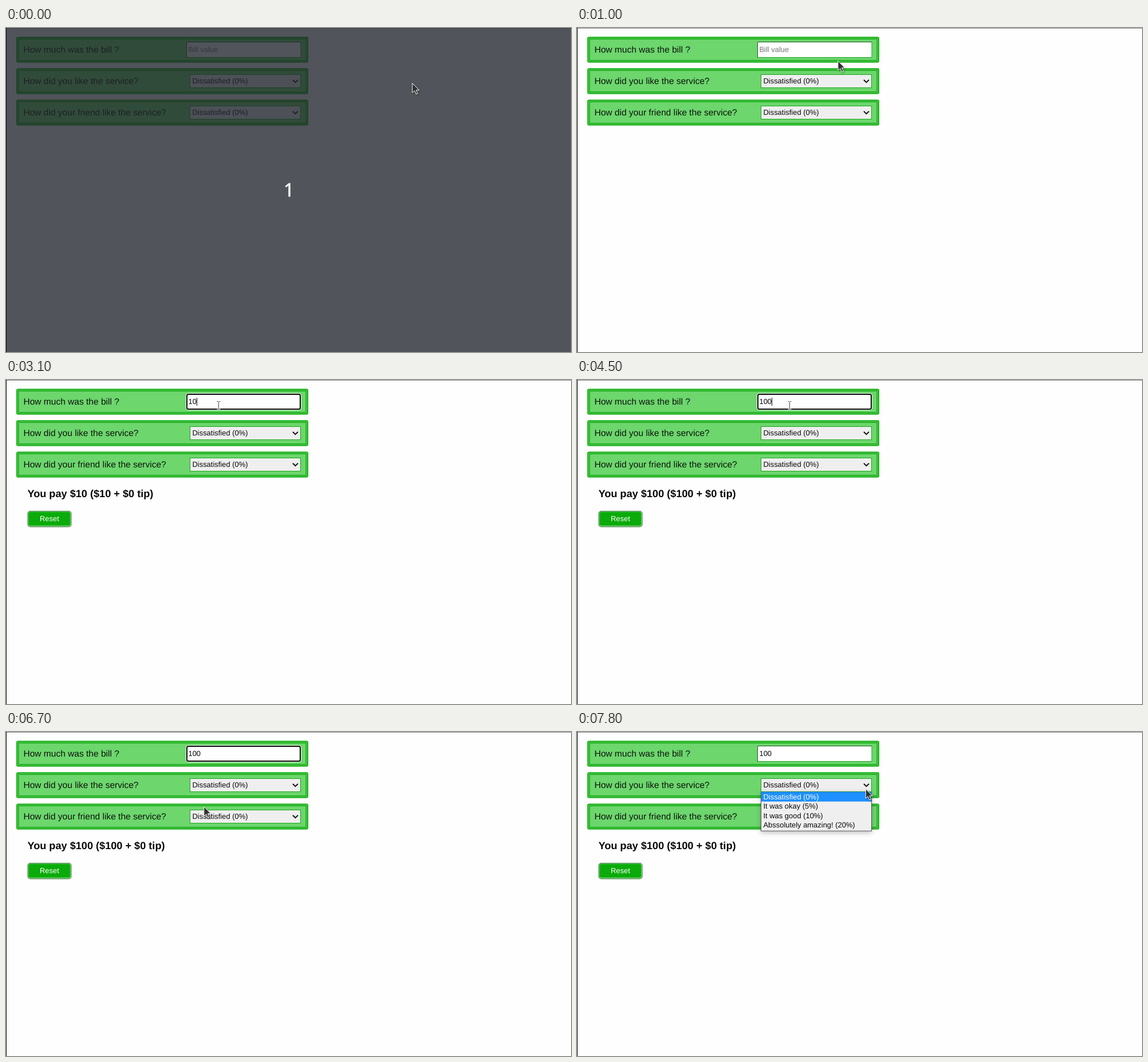
An HTML page for the animation above (8000 ms loop, 987 px wide and 567 px high).

```html
<!DOCTYPE html>
<html lang="en">
<head>
<meta charset="utf-8">
<title>Tip calculator</title>
<style>
  html, body { margin: 0; width: 100%; height: 100%; overflow: hidden; background: #fefefe; }
  svg { display: block; width: 987px; height: 567px; }
  text { font: 12.93px "Liberation Sans", Arial, sans-serif; fill: #080808; white-space: pre; text-rendering: geometricPrecision; }
  .label { font-size: 15.52px; fill: #0b140b; }
  .total { font-size: 18.15px; font-weight: bold; }
  .light { fill: #fff; }
  .hint { fill: #757575; }
  .count { font: 32.5px "Noto Sans", "Open Sans", sans-serif; fill: #fff; stroke: #fff; stroke-width: .5; text-anchor: middle; }
  .line { fill: none; stroke: #1aae1a; }
  .shadow { filter: drop-shadow(1px 2px 1.5px rgba(0, 0, 0, .35)); }
  .popup { filter: drop-shadow(0 3px 4px rgba(0, 0, 0, .25)); }
</style>
</head>
<body>
<svg viewBox="0 0 987 567">
  <defs>
    <g id="row">
      <rect x="18" y="-22.6" width="510" height="45.2" rx="3" fill="#6dd66d"/>
      <rect class="line" x="19" y="-21.6" width="508" height="43.2" rx="2" stroke-width="2"/>
      <rect class="line" x="21.8" y="-18.8" width="502.4" height="37.6" stroke-width="1.7"/>
    </g>
    <g id="select">
      <rect x="321.5" y="-11.5" width="193" height="23" fill="#efefef" stroke="#1aa51a"/>
      <text x="325.5" y="4.2">Dissatisfied (0%)</text>
      <path d="M501 -2.3l4.5 4.5 4.5 -4.5" fill="none" stroke="#111" stroke-width="2"/>
    </g>
  </defs>

  <rect width="987" height="567" fill="#fefefe"/>
  <rect width="987" height="1" fill="#8a8a8a"/>

  <use href="#row" y="38"/>
  <use href="#row" y="93"/>
  <use href="#row" y="148"/>
  <text class="label" x="30.5" y="43.2">How much was the bill ?</text>
  <text class="label" x="30.5" y="98.2">How did you like the service?</text>
  <text class="label" x="30.5" y="153.2">How did your friend like the service?</text>
  <use href="#select" y="93"/>
  <use href="#select" y="148"/>

  <rect x="315" y="24" width="200" height="28" fill="#fff"/>
  <g id="plain" fill="none">
    <path d="M515 24.5V51.5H315" stroke="#1aa51a"/>
    <path d="M315.5 52V24.5H515" stroke="#175c17"/>
  </g>
  <g id="focus">
    <rect x="314.5" y="23.5" width="201" height="29" rx="4" fill="#fff" stroke="#e6f7e6"/>
    <rect x="316" y="25" width="198" height="26" rx="2.5" fill="#fff" stroke="#0c0c0c" stroke-width="2"/>
  </g>
  <text id="hint" class="hint" x="318.5" y="42.3">Bill value</text>
  <text id="value" x="318.5" y="42.3"></text>
  <rect id="caret" y="31" width="1" height="14"/>

  <g id="result">
    <text id="total" class="total" x="37.4" y="204.7"></text>
    <rect x="37.5" y="229" width="77" height="28.5" rx="5" fill="#448344"/>
    <rect x="38.7" y="230.2" width="74.8" height="26.1" rx="4" fill="#83d783"/>
    <rect x="39.5" y="231" width="72.7" height="23.8" rx="3" fill="#0aab0a"/>
    <text class="light" x="59" y="246.5">Reset</text>
  </g>

  <g id="popup">
    <rect class="popup" x="321" y="104" width="194" height="69.5" fill="#efefef"/>
    <rect x="321.5" y="104.5" width="193" height="68.7" fill="#efefef" stroke="#555"/>
    <rect x="322" y="105" width="192" height="16.7" fill="#1e90ff"/>
    <path d="M321 104.5H515" stroke="#1a8f3a"/>
    <text class="light" x="325.5" y="117.5">Dissatisfied (0%)</text>
    <text x="325.5" y="134">It was okay (5%)</text>
    <text x="325.5" y="150.7">It was good (10%)</text>
    <text x="325.5" y="167.2">Abssolutely amazing! (20%)</text>
  </g>

  <g id="countdown">
    <rect width="987" height="567" fill="#20252c" opacity=".78"/>
    <text class="count" x="494.2" y="295.2">1</text>
  </g>
  <rect width="1" height="567" fill="#0a0a0a"/>

  <path id="arrow" class="shadow" d="M-.2 .6V17.2L3.7 13.8 6.5 20 9.2 18.8 6.5 12.7H11.6Z" fill="#303030" stroke="#fff" stroke-width="1"/>
  <g id="beam" fill="none">
    <path d="M-3 -6.5H-1L0 -5.5 1 -6.5H3M0 -5.5V6.5M-3 7.5H-1L0 6.5 1 7.5H3" stroke="#fff" stroke-width="2.6" opacity=".75"/>
    <path d="M-3 -6.5H-1L0 -5.5 1 -6.5H3M0 -5.5V6.5M-3 7.5H-1L0 6.5 1 7.5H3" stroke="#444"/>
  </g>
</svg>
<script>
const LOOP = 8000, STEP = 100;
const el = id => document.getElementById(id);
const show = (id, on) => { el(id).style.display = on ? "" : "none"; };

const ease = {
  in: p => 1 - Math.cos(p * Math.PI / 2),
  out: p => Math.sin(p * Math.PI / 2),
  both: p => (1 - Math.cos(p * Math.PI)) / 2,
  hold: p => p < 1 ? 0 : 1
};

// time, x, y, easing towards this point
const path = [
  [0, 710, 96],
  [400, 710, 96, "hold"],
  [1300, 371.5, 44, "both"],
  [4500, 371.5, 44, "hold"],
  [5300, 107, 194, "both"],
  [5400, 107, 194, "hold"],
  [5700, 164, 217, "both"],
  [5900, 191, 219, "out"],
  [6100, 192, 219, "hold"],
  [6400, 192, 219, "hold"],
  [6700, 346, 130, "in"],
  [7300, 504, 100, "out"],
  [7500, 504.5, 99, "both"],
  [LOOP, 504.5, 99, "hold"]
];
const caretOn = [[1500, 2000], [2600, 4000], [4500, 5100], [5800, 6300], [6900, 7400]];

function pointer(t) {
  const i = path.findIndex(key => key[0] > t);
  const [t0, x0, y0] = path[i - 1], [t1, x1, y1, kind] = path[i];
  const p = ease[kind]((t - t0) / (t1 - t0));
  return [x0 + (x1 - x0) * p, y0 + (y1 - y0) * p];
}

function draw(t) {
  const bill = t < 2600 ? "" : t < 3100 ? "1" : t < 3300 ? "10" : "100";
  const focused = t >= 1500 && t < 7700;
  show("countdown", t < 100);
  show("plain", !focused);
  show("focus", focused);
  show("hint", !bill);
  show("result", bill);
  show("popup", t >= 7800);
  show("caret", caretOn.some(([from, to]) => t >= from && t < to));
  el("value").textContent = bill;
  el("total").textContent = `You pay $${bill} ($${bill} + $0 tip)`;
  el("caret").setAttribute("x", Math.round(318.6 + 7.19 * bill.length));

  const [x, y] = pointer(t);
  const overInput = x > 315 && x < 515 && y > 24 && y < 52;
  show("arrow", !overInput);
  show("beam", overInput);
  el(overInput ? "beam" : "arrow").setAttribute("transform", `translate(${x} ${y})`);
}

const start = performance.now();
function tick() {
  const t = Math.max(0, performance.now() - start) % LOOP;
  draw(Math.floor(t / STEP) * STEP);
  requestAnimationFrame(tick);
}
tick();
</script>
</body>
</html>
```
